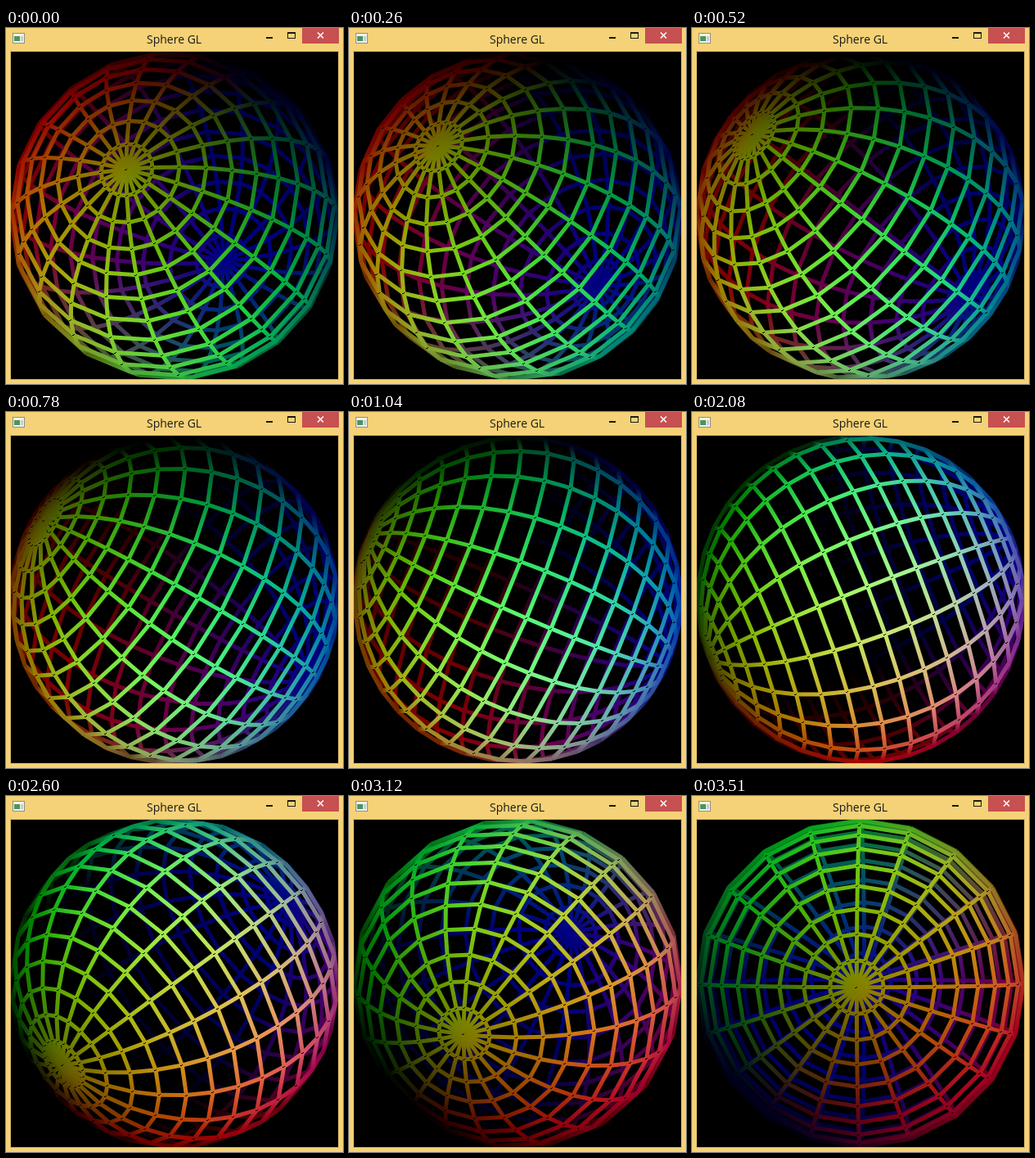
Recreate the animation shown at these times as an HTML page with a canvas. Size 412 px wide and 435 px high, loop 3640 ms.

```html
<!DOCTYPE html>
<html lang="en">
<head>
<meta charset="utf-8">
<title>Sphere GL</title>
<style>
  html, body { margin: 0; width: 100%; height: 100%; overflow: hidden; background: #f5d277; }
  svg, canvas { position: absolute; display: block; }
  svg { left: 0; top: 0; }
  canvas { left: 6px; top: 29px; background: #000; }
</style>
</head>
<body>
<svg width="412" height="435" viewBox="0 0 412 435">
  <rect width="412" height="435" fill="#f5d277"/>
  <g shape-rendering="crispEdges">
    <rect x="5" y="28" width="402" height="402" fill="#d2b468"/>
    <rect x="8" y="6" width="15" height="13" fill="#8d8f86"/>
    <rect x="9" y="7" width="13" height="11" fill="#f2f2ea"/>
    <rect x="10" y="10" width="7" height="6" fill="#4c9560"/>
    <rect x="18" y="10" width="3" height="6" fill="#c9cfc8"/>
    <rect x="318" y="11" width="8" height="2" fill="#1a1a1a"/>
    <path d="M344 5h10v8h-10zM345 7v5h8v-5z" fill="#1a1a1a" fill-rule="evenodd"/>
    <rect x="362" y="0" width="45" height="19" fill="#c75050"/>
  </g>
  <path d="M381 5.5l7 7M388 5.5l-7 7" stroke="#fff" stroke-width="1.6"/>
  <text x="172" y="19" font-family="'Open Sans', 'Noto Sans', sans-serif" font-size="14" fill="#1a1a1a">Sphere GL</text>
</svg>
<canvas id="view" width="400" height="400"></canvas>
<script>
const STACKS = 19, SLICES = 20, RADIUS = 200, LINE = 5;
const STEP_MS = 130, STEPS = 28;
const START_DEG = 17.2, STEP_DEG = 5.98;
const ctx = document.getElementById('view').getContext('2d');

// Unit sphere grid; the stack index runs from the -z pole to the +z pole.
const grid = [];
for (let i = 0; i <= STACKS; i++) {
  const t = Math.PI * i / STACKS;
  grid.push(Array.from({ length: SLICES }, (_, j) => {
    const a = 2 * Math.PI * j / SLICES;
    return [Math.sin(t) * Math.cos(a), Math.sin(t) * Math.sin(a), -Math.cos(t)];
  }));
}

// Equal turns about y and x; depth is +1 nearest to the viewer.
// The colour follows the normal, with extra light on the near half.
function project([x, y, z], angle) {
  const s = Math.sin(angle), c = Math.cos(angle);
  const vx = -x * c + z * s;
  const turned = -x * s - z * c;
  const vy = -y * c + turned * s;
  const depth = y * s + turned * c;
  const light = Math.sqrt(Math.max(0, depth)) / 2;
  const rgb = [x, y, z].map(n => Math.round(255 * Math.min(1, Math.max(0, n / 2 + light))));
  return {
    x: RADIUS * (1 + vx),
    y: RADIUS * (1 - vy),
    depth,
    color: `rgb(${rgb})`
  };
}

function drawLine({ a, b }) {
  if (Math.hypot(b.x - a.x, b.y - a.y) < 0.05) return;
  const paint = ctx.createLinearGradient(a.x, a.y, b.x, b.y);
  paint.addColorStop(0, a.color);
  paint.addColorStop(1, b.color);
  ctx.strokeStyle = paint;
  ctx.beginPath();
  ctx.moveTo(a.x, a.y);
  ctx.lineTo(b.x, b.y);
  ctx.stroke();
}

function drawJoint({ x, y }) {
  const px = Math.round(x), py = Math.round(y);
  ctx.fillRect(px - 2, py, 2, 1);
  ctx.fillRect(px, py - 1, 1, 1);
}

function drawSphere(step) {
  const angle = (START_DEG + STEP_DEG * step) * Math.PI / 180;
  const points = grid.map(ring => ring.map(p => project(p, angle)));
  const lines = [];
  const add = (a, b) => lines.push({ a, b, depth: a.depth + b.depth });
  for (let i = 0; i < STACKS; i++) {
    for (let j = 0; j < SLICES; j++) {
      add(points[i][j], points[i + 1][j]);
      if (i > 0) add(points[i][j], points[i][(j + 1) % SLICES]);
    }
  }
  lines.sort((p, q) => p.depth - q.depth);
  ctx.fillStyle = '#000';
  ctx.fillRect(0, 0, 400, 400);
  ctx.lineWidth = LINE;
  lines.forEach(drawLine);
  points.flat().filter(p => p.depth > 0.2).forEach(drawJoint);
}

let shown = -1;
const start = performance.now();
function tick() {
  const step = Math.floor((performance.now() - start) / STEP_MS) % STEPS;
  if (step !== shown) drawSphere(shown = step);
  requestAnimationFrame(tick);
}
tick();
</script>
</body>
</html>
```
